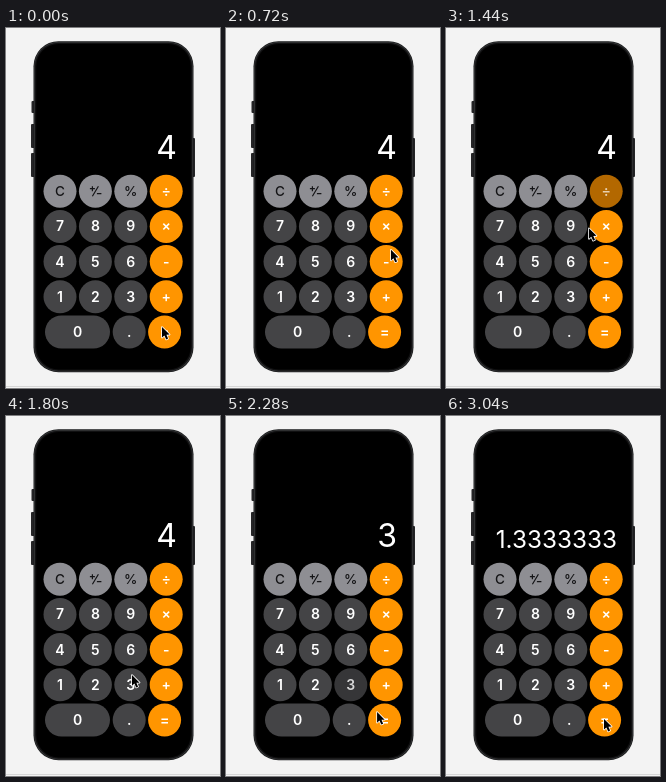
Write an HTML page with a canvas that moves like this. It is 214 by 360 pixels and loops after 3.08 s.

```html
<!DOCTYPE html>
<html>
<head>
<meta charset="utf-8">
<style>
html, body { margin: 0; width: 214px; height: 360px; overflow: hidden; background: #f3f3f3; }
canvas { display: block; width: 214px; height: 360px; }
</style>
</head>
<body>
<canvas id="stage"></canvas>
<script>
const LOOP = 3080;
const canvas = document.getElementById('stage');
const ctx = canvas.getContext('2d');
const dpr = window.devicePixelRatio || 1;
canvas.width = 214 * dpr;
canvas.height = 360 * dpr;

const GREY = '#8e8e93', DARK = '#444446', ORANGE = '#ff9500';
const FONT = 'Inter, "Liberation Sans", sans-serif';

// time, x, y of the pointer tip
const path = [
  [0, 156, 299], [340, 157, 299], [720, 165, 222], [1000, 160, 163],
  [1280, 160, 163], [1440, 143, 200], [1640, 129, 249], [1800, 126, 259],
  [1960, 125, 263], [2110, 126, 264], [2280, 151, 296], [2420, 158, 303],
  [LOOP, 158, 303]
];
const presses = { '÷': 1230, '3': 2000, '=': 2480 };

const keys = [];
['C±%÷', '789×', '456-', '123+'].forEach((row, r) => {
  [...row].forEach((label, c) => {
    const fill = c === 3 ? ORANGE : r === 0 ? GREY : DARK;
    keys.push({ label, x: 54 + c * 35.4, y: 163.2 + r * 35.2, w: 33, fill });
  });
});
keys.push({ label: '0', x: 71.5, y: 304, w: 65, fill: DARK });
keys.push({ label: '.', x: 123.2, y: 304, w: 33, fill: DARK });
keys.push({ label: '=', x: 158.6, y: 304, w: 33, fill: ORANGE });

const clamp = v => Math.max(0, Math.min(1, v));

function box(x, y, w, h, r, fill) {
  ctx.fillStyle = fill;
  ctx.beginPath();
  ctx.roundRect(x, y, w, h, r);
  ctx.fill();
}

function text(s, x, y, size, weight, align, color) {
  ctx.font = `${weight} ${size}px ${FONT}`;
  ctx.textAlign = align;
  ctx.fillStyle = color;
  ctx.fillText(s, x, y);
}

function slope(i, k) {
  const a = path[i - 1], b = path[i], c = path[i + 1];
  if (!a || !c) return 0;
  const s1 = (b[k] - a[k]) / (b[0] - a[0]);
  const s2 = (c[k] - b[k]) / (c[0] - b[0]);
  return s1 * s2 <= 0 ? 0 : 2 * s1 * s2 / (s1 + s2);
}

function pointerAt(t) {
  let i = 0;
  while (i < path.length - 2 && t >= path[i + 1][0]) i++;
  const a = path[i], b = path[i + 1], d = b[0] - a[0];
  const u = (t - a[0]) / d, u2 = u * u, u3 = u2 * u;
  return [1, 2].map(k =>
    a[k] * (2 * u3 - 3 * u2 + 1) + b[k] * (3 * u2 - 2 * u3) +
    d * (slope(i, k) * (u3 - 2 * u2 + u) + slope(i + 1, k) * (u3 - u2)));
}

function keyAlpha(label, t) {
  if (!(label in presses)) return 1;
  const s = t - presses[label];
  return 1 - 0.4 * clamp(s / 100) * (1 - clamp((s - 140) / 280));
}

function drawPhone() {
  box(25.5, 73, 4, 12, 1, '#252527');
  box(25, 96, 4, 24, 1, '#252527');
  box(25, 125, 4, 24, 1, '#252527');
  box(185, 110, 4, 39, 1, '#252527');
  box(27.5, 13.2, 160, 331, 25, '#1a1b1c');
  box(28.3, 14, 158.4, 329.4, 24.3, '#38393b');
  box(29, 14.7, 157, 328, 23.6, '#101011');
  box(30.3, 16, 154.4, 325.4, 22.4, '#000');
}

function drawSign(x, y) {
  ctx.strokeStyle = '#151517';
  ctx.lineWidth = 1.2;
  ctx.beginPath();
  ctx.moveTo(x - 5.5, y - 2.5); ctx.lineTo(x - 0.5, y - 2.5);
  ctx.moveTo(x - 3, y - 5); ctx.lineTo(x - 3, y);
  ctx.moveTo(x + 3, y - 5); ctx.lineTo(x - 3, y + 5);
  ctx.moveTo(x + 1.5, y + 2.5); ctx.lineTo(x + 6, y + 2.5);
  ctx.stroke();
}

function drawKey({ label, x, y, w, fill }, t) {
  ctx.globalAlpha = keyAlpha(label, t);
  box(x - w / 2, y - 16.5, w, 33, 16.5, fill);
  if (label === '±') drawSign(x, y);
  else if (fill === GREY) text(label, x, y + 4.9, 13.5, 500, 'center', '#151517');
  else text(label, x, y + 5, 14, 600, 'center', '#fff');
  ctx.globalAlpha = 1;
}

function drawPointer(x, y) {
  const pts = [[0, 0], [0, 10.6], [2.4, 8.4], [4.2, 12.4], [6.1, 11.6], [4.4, 7.7], [7.6, 7.6]];
  ctx.beginPath();
  pts.forEach(([px, py]) => ctx.lineTo(x + px, y + py));
  ctx.closePath();
  ctx.lineJoin = 'round';
  ctx.lineWidth = 1.6;
  ctx.strokeStyle = '#fff';
  ctx.stroke();
  ctx.fillStyle = '#000';
  ctx.fill();
}

function render(t) {
  ctx.setTransform(dpr, 0, 0, dpr, 0, 0);
  ctx.fillStyle = '#f3f3f3';
  ctx.fillRect(0, 0, 214, 360);
  ctx.fillStyle = '#d6d6d6';
  ctx.fillRect(0, 358, 214, 1);
  drawPhone();
  if (t >= 2600) text('1.3333333', 171, 132, 24.3, 400, 'right', '#fff');
  else text(t < 2120 ? '4' : '3', 171, 131, 32, 400, 'right', '#fff');
  keys.forEach(k => drawKey(k, t));
  drawPointer(...pointerAt(t));
}

const start = performance.now();
function tick() {
  render((performance.now() - start) % LOOP);
  requestAnimationFrame(tick);
}
tick();
</script>
</body>
</html>
```
